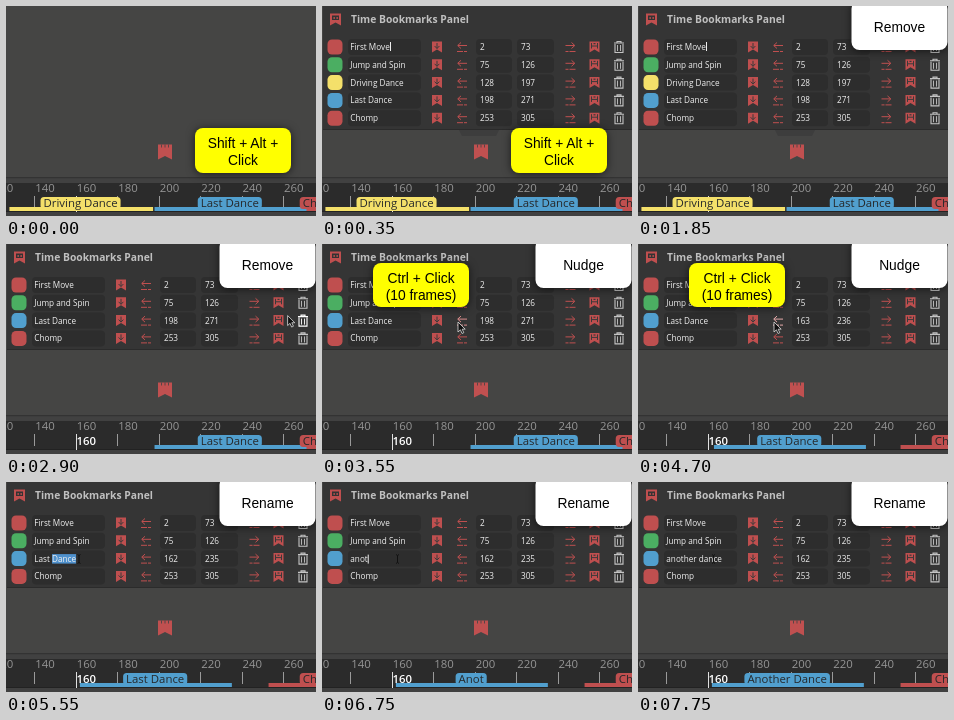
These frames come from a looping animation (310 px wide and 210 px high, 8 s). An HTML page:

```html
<!DOCTYPE html>
<html lang="en">
<head>
<meta charset="utf-8">
<title>Time bookmarks</title>
<style>
  html, body { margin: 0; width: 100%; height: 100%; overflow: hidden; background: #454544; }
  svg { display: block; width: 310px; height: 210px; }
  text { white-space: pre; font-family: "Open Sans", "Noto Sans", sans-serif; }
  .field { font-size: 8.2px; font-weight: 500; fill: #f0f0f0; }
  .title { font-size: 10.3px; font-weight: 700; fill: #c0c0c0; }
  .ruler { font-size: 11.4px; fill: #959595; }
  .label { font-size: 11.4px; fill: #26282a; }
  .now { font-size: 11.4px; font-weight: 600; fill: #fff; }
  .tip { font: 13.8px "Liberation Sans", Arial, sans-serif; text-anchor: middle; fill: #000; }
</style>
</head>
<body>
<svg id="stage" viewBox="0 0 310 210"></svg>
<script>
const LOOP = 8000, STEP = 50;
const RED = '#bf4f4f', GREEN = '#4bae62', YELLOW = '#f4e06a', BLUE = '#519fce';
const stage = document.getElementById('stage');
const pen = document.createElement('canvas').getContext('2d');

const clamp = v => Math.max(0, Math.min(1, v));
const progress = (t, from, to) => clamp((t - from) / (to - from));
const mix = (a, b, p) => a + (b - a) * p;
const frameX = frame => 28.3 + (frame - 140) * 2.073;
const within = (t, from, to) => t >= from && t < to;

function measure(text, size, weight = 400) {
  pen.font = `${weight} ${size}px "Open Sans", "Noto Sans", sans-serif`;
  return pen.measureText(text).width;
}

const rect = (x, y, w, h, fill, extra = '') =>
  `<rect x="${x}" y="${y}" width="${w}" height="${h}" fill="${fill}" ${extra}/>`;
const path = (d, fill, extra = '') => `<path d="${d}" fill="${fill}" ${extra}/>`;
const stroke = (d, color, width = 1) => path(d, 'none', `stroke="${color}" stroke-width="${width}"`);
const text = (x, y, cls, value) => `<text x="${x}" y="${y}" class="${cls}">${value}</text>`;
const at = (x, y, body) => `<g transform="translate(${x} ${y})">${body}</g>`;

// Keystrokes of the new name
const NAME = 'another dance';
const KEYS = [6350, 6500, 6650, 6700, 6800, 6850, 6950, 7000, 7200, 7250, 7350, 7400, 7500];

function nameAt(t) {
  return t < KEYS[0] ? 'Last Dance' : NAME.slice(0, KEYS.filter(k => k <= t).length);
}

const BIG_NUDGES = [3750, 3900, 4050];
const SMALL_NUDGES = [4300, 4400, 4500, 4600, 4700, 4800];

function nudgeAt(t) {
  const count = list => list.filter(k => k <= t).length;
  return 10 * count(BIG_NUDGES) + count(SMALL_NUDGES);
}

function bookmarksAt(t) {
  const shift = nudgeAt(t);
  const list = [
    { name: 'First Move', color: RED, start: 2, end: 73 },
    { name: 'Jump and Spin', color: GREEN, start: 75, end: 126 },
    { name: 'Driving Dance', color: YELLOW, start: 128, end: 197 },
    { name: nameAt(t), color: BLUE, start: 198 - shift, end: 271 - shift, edited: true },
    { name: 'Chomp', color: RED, start: 253, end: 305 }
  ];
  if (t >= 2400) list.splice(2, 1);
  return list;
}

// Icons, centred on the origin
const markShape = 'M-5 -5.5H5V5.5L0 2.5L-5 5.5Z';

const pinIcon = () => path(markShape, RED) +
  stroke('M0 -4V1.5M-2.4 -1L0 1.5L2.4 -1', '#3a3a3a');

const rangeIcon = () => path(markShape, RED) +
  stroke('M-3 -4V1.5M3 -4V1.5M-3 -1H3', '#3a3a3a') + rect(-1, -4, 2, 1.2, '#3a3a3a');

const arrowIcon = (dir, color) => `<g transform="scale(${dir} 1)">` +
  stroke('M-5 -1.5H4M1 -4.5L4.3 -1.5L1 1.5', color) +
  stroke('M-5 4.5H-2M-1 4.5H5', color) + '</g>';

const trashIcon = color => stroke('M-5 -4H5M-2 -4V-5.5H2V-4M-4 -3V5.5H4V-3', color, 1.1) +
  stroke('M-1.5 -2V4M1.5 -2V4', color, .9);

const bigMark = () => at(159, 146,
  path('M-7 -7.5H7V7.5L0 4L-7 7.5Z', '#c05050') +
  stroke('M-3.5 -7.5V-4.5M0 -7.5V-4.5M3.5 -7.5V-4.5', '#4b4544', .9));

function field(x, y, width, value, dx = 3) {
  return rect(x, y - 8, width, 16, '#2d2d2d', 'rx="4"') + text(x + dx, y + 3, 'field', value);
}

function caret(x, y) {
  return rect(x, y - 5, 1, 9, '#eee');
}

function nameField(item, index, y, t) {
  const left = 28.3;
  const width = value => measure(value, 8.2, 500);
  let body = field(26, y, 73, '');
  if (item.edited) {
    const whole = within(t, 6050, KEYS[0]);
    if (within(t, 5550, 5950) || whole) {
      const from = left + (whole ? 0 : width('Last '));
      body += rect(from, y - 4.5, left + width(item.name) - from, 9.5, '#4f91cd');
    }
    if (within(t, KEYS[0], 7750)) body += caret(left + width(item.name), y + 1);
  }
  const blinkOn = within(t, 350, 500) || within(t, 750, 950) || within(t, 1200, 1450) ||
    within(t, 1700, 1950) || within(t, 2150, 2350);
  if (index === 0 && blinkOn) body += caret(68, y);
  return body + text(left, y + 3, 'field', item.name);
}

function row(item, index, t) {
  const y = 41 + index * 17.8;
  const target = index === 2;
  const overTrash = target && within(t, 2100, 2950);
  const overNudge = target && within(t, 3250, 5150);
  const pressed = [...BIG_NUDGES, ...SMALL_NUDGES].some(k => within(t, k, k + STEP));
  const nudgeColor = overNudge ? (pressed ? '#e6aaaa' : '#dc8d8d') : RED;
  return rect(5.5, y - 7.5, 15, 15, item.color, 'rx="4.5"') +
    nameField(item, index, y, t) +
    at(115, y, pinIcon()) +
    at(140, y, arrowIcon(-1, nudgeColor)) +
    field(154, y, 36, item.start, 4) +
    field(195, y, 37, item.end, 4) +
    at(248.5, y, arrowIcon(1, RED)) +
    at(272.5, y, rangeIcon()) +
    at(297, y, trashIcon(overTrash ? '#fff' : '#c4c4c4'));
}

function panel(items, t) {
  const opacity = progress(t, 0, 350);
  if (!opacity) return '';
  const tall = t < 2450, bottom = tall ? 124 : 106;
  return `<g opacity="${opacity}">` +
    (tall ? path('M137 124H177L174 130H140Z', '#3d3d3d') : '') +
    rect(1, -1, 309, bottom + 1, '#353535') +
    rect(1, bottom - 1, 309, 1, '#2b2b2b') +
    at(13.5, 13.5, path('M-5.5 -6H5.5V6L0 3L-5.5 6Z', RED) +
      rect(-3.5, -4, 7, 4.5, '#333') + rect(-2, -2.5, 1.3, 2, RED) + rect(1, -2.5, 1.3, 2, RED)) +
    text(29, 17, 'title', 'Time Bookmarks Panel') +
    items.map((item, i) => row(item, i, t)).join('') + '</g>';
}

function timeline(items) {
  let body = rect(0, 171, 310, 1.5, '#333') + rect(0, 172.5, 310, 4.5, '#414141') +
    rect(0, 177, 310, 29, '#2b2b2b') + rect(0, 205, 310, 1, '#222') +
    rect(0, 206, 310, 4, '#404040');
  for (let frame = 120; frame <= 260; frame += 20) {
    const x = frameX(frame);
    body += rect(Math.round(x), 190, 1, 12, '#9a9a9a') + text(x + 1, 186, 'ruler', frame);
  }
  body += rect(70, 190, 1, 16, '#e0e0e0') + text(70.5, 201, 'now', '160');
  const shown = items.filter(item => item.end > 127).reverse();
  for (const item of shown) {
    const x = frameX(item.start);
    body += rect(x, 201, frameX(item.end + .3) - x, 4, item.color);
  }
  for (const item of shown) {
    const title = item.name.replace(/\b[a-z]/g, c => c.toUpperCase());
    const width = measure(title, 11.4);
    const x = (frameX(item.start) + frameX(item.end)) / 2 - width / 2 - .4;
    body += rect(x - 3, 191, width + 6, 12, item.color, 'rx="3.5"') +
      text(x, 201, 'label', title);
  }
  return body;
}

function tip(x, y, w, h, fill, lines, opacity = 1) {
  const first = lines.length > 1 ? 19.5 : 31;
  return `<g opacity="${opacity}">` +
    rect(x, y, w, h, fill, 'rx="8" style="filter:drop-shadow(0 1px 4px rgba(0,0,0,.6))"') +
    lines.map((line, i) => text(x + w / 2, y + first + i * 17, 'tip', line)).join('') + '</g>';
}

function tips(t) {
  let body = '';
  const fade = 1 - progress(t, 1650, 1850);
  if (fade) body += tip(189, 122, 96, 45, '#ffff00', ['Shift + Alt +', 'Click'], fade);
  if (within(t, 3550, 5050)) body += tip(51, 19, 96, 44, '#ffff00', ['Ctrl + Click', '(10 frames)']);
  if (t >= 1450) {
    const word = t < 3550 ? 'Remove' : t < 5050 ? 'Nudge' : 'Rename';
    body += tip(213.5, -5, 96, 49, '#fff', [word], t < 1550 ? .6 : 1);
  }
  return body;
}

// Time, x and y of the pointer's resting points
const ROUTE = [
  [1850, 311, 100], [2150, 294, 71], [2866, 294, 71],
  [3300, 136, 78], [5050, 136, 78], [5550, 73, 77], [5650, 75.5, 77]
];

function pointer(t) {
  if (t <= ROUTE[0][0]) return '';
  const next = ROUTE.findIndex(stop => stop[0] > t);
  let [, x, y] = ROUTE[ROUTE.length - 1];
  if (next > 0) {
    const [a, b] = [ROUTE[next - 1], ROUTE[next]];
    const p = progress(t, a[0], b[0]);
    x = mix(a[1], b[1], p);
    y = mix(a[2], b[2], p);
  }
  if (x < 99) return at(x, y, stroke('M-1.5 -4.5L0 -3.5L1.5 -4.5M0 -3.5V3.5M-1.5 4.5L0 3.5L1.5 4.5', '#111', 1));
  return at(x, y, path('M0 0V10L2.4 7.8L4 11.5L5.8 10.7L4.2 7.2H7.2Z', '#111',
    'stroke="#ddd" stroke-width=".8"'));
}

function scene(t) {
  const items = bookmarksAt(t);
  return rect(0, 0, 310, 210, '#454544') + bigMark() + timeline(items) +
    panel(items, t) + tips(t) + pointer(t);
}

const begun = performance.now();
let shownTick = -1;

function play() {
  const tick = Math.floor(((performance.now() - begun) % LOOP) / STEP);
  if (tick !== shownTick) {
    shownTick = tick;
    stage.innerHTML = scene(tick * STEP);
  }
  requestAnimationFrame(play);
}
play();
</script>
</body>
</html>
```
